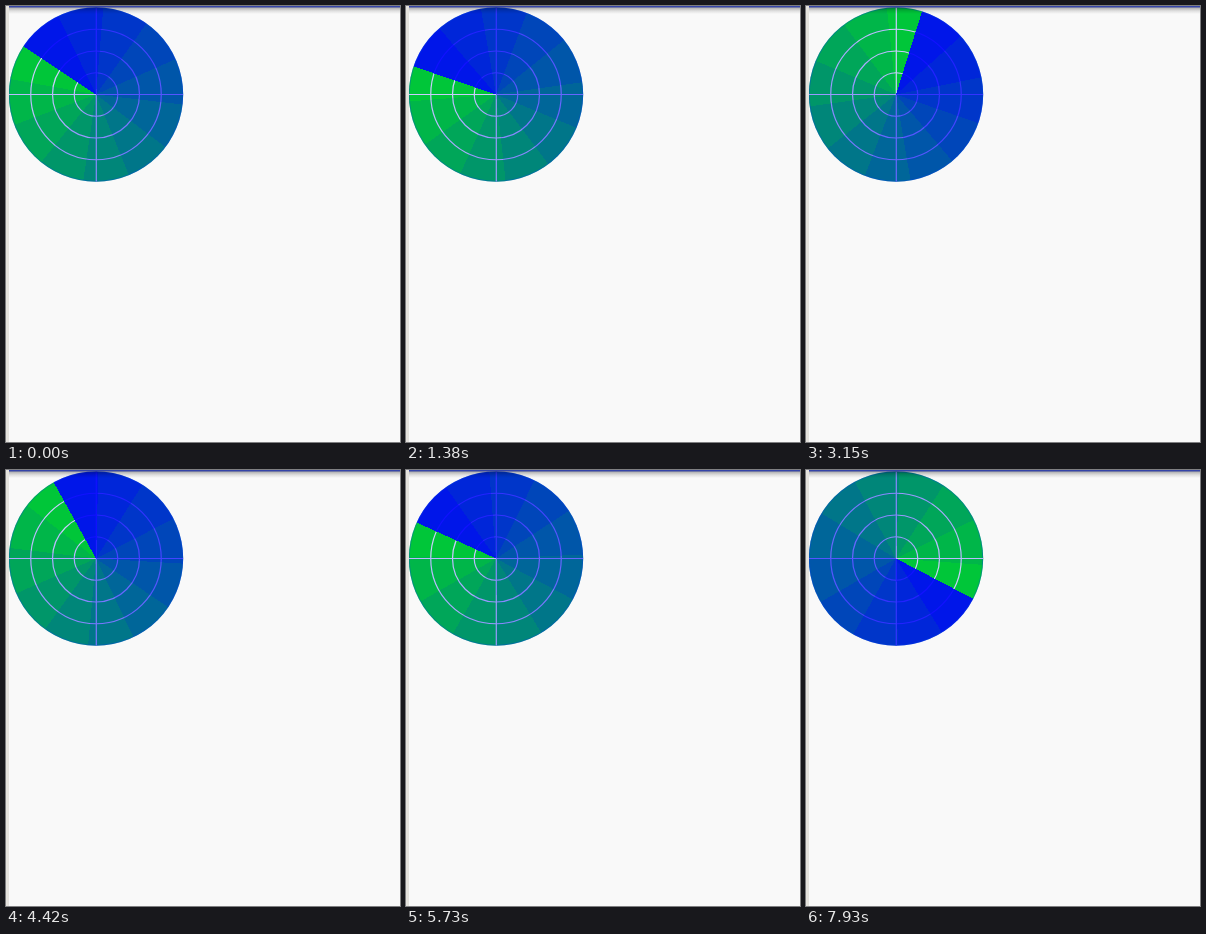
Write an HTML page with a canvas that moves like this. It is 394 px wide and 436 px high and loops after 8000 ms.

```html
<!DOCTYPE html>
<html lang="en">
<head>
<meta charset="utf-8">
<title>Radar sweep</title>
<style>
  html, body { margin: 0; width: 100%; height: 100%; overflow: hidden; background: #f9f9f9; }
  canvas { display: block; }
  .shade { position: absolute; left: 3px; top: 0; width: 391px; height: 8px;
    background: linear-gradient(#3444a8 0 1px, rgba(42, 52, 120, .65) 1px 2px,
      rgba(0, 0, 0, .28) 2px, rgba(0, 0, 0, .1) 5px, rgba(0, 0, 0, 0) 8px); }
  .edge { position: absolute; left: 0; top: 0; width: 3px; height: 100%; background: #e4e2dd; }
</style>
</head>
<body>
<canvas width="394" height="436"></canvas>
<div class="shade"></div>
<div class="edge"></div>
<script>
const ctx = document.querySelector('canvas').getContext('2d');
const LOOP = 8000, CX = 90, CY = 88.5, R = 87;
const SECTORS = 12, SECTOR_TURN = 0.085;

// The sweep advances in runs of eight evenly spaced steps: first and last time in ms
const RUNS = [[120, 1100], [1250, 2150], [2300, 3300], [3430, 4420],
  [4540, 5580], [5730, 6690], [6840, 7810]];

const runTimes = ([first, last]) =>
  Array.from({ length: 8 }, (_, i) => Math.floor((first + (last - first) * i / 7) / 10) * 10);
const times = [0, ...RUNS.flatMap(runTimes), 7930];

// Degrees clockwise from east; the turn slows slightly after the third second
const sweep = t => 1007.4 + (t - 3150) * (t < 3150 ? 0.252 : 0.2469);

function sectorPaint(angle, color) {
  const paint = ctx.createConicGradient(angle, CX, CY);
  for (let k = 0; k < SECTORS; k++) {
    const c = color(k);
    paint.addColorStop(k * SECTOR_TURN, c);
    paint.addColorStop(Math.min(1, (k + 1) * SECTOR_TURN), c);
  }
  return paint;
}

function circle(r) {
  ctx.beginPath();
  ctx.arc(CX, CY, r, 0, 2 * Math.PI);
}

function line(x0, y0, x1, y1) {
  ctx.beginPath();
  ctx.moveTo(x0, y0);
  ctx.lineTo(x1, y1);
  ctx.stroke();
}

function draw(degrees) {
  const angle = degrees % 360 * Math.PI / 180;
  ctx.clearRect(0, 0, 394, 436);
  ctx.fillStyle = sectorPaint(angle, k => `rgb(0, ${22 + 16 * k}, ${233 - 16 * k})`);
  circle(R + 0.2);
  ctx.fill();

  ctx.lineWidth = 1;
  ctx.strokeStyle = 'rgba(0, 70, 230, .35)';
  circle(R - 0.3);
  ctx.stroke();

  ctx.lineWidth = 1.2;
  ctx.strokeStyle = sectorPaint(angle, k => `rgb(${17 * k + 17}, ${17 * k + 17}, 255)`);
  for (let i = 1; i < 4; i++) {
    circle(R * i / 4);
    ctx.stroke();
  }
  line(CX - R, CY, CX + R, CY);
  line(CX + 0.3, CY - R, CX + 0.3, CY + R);
}

function frame() {
  const t = performance.now() % LOOP;
  draw(sweep(times.findLast(s => s <= t)));
  requestAnimationFrame(frame);
}
frame();
</script>
</body>
</html>
```
